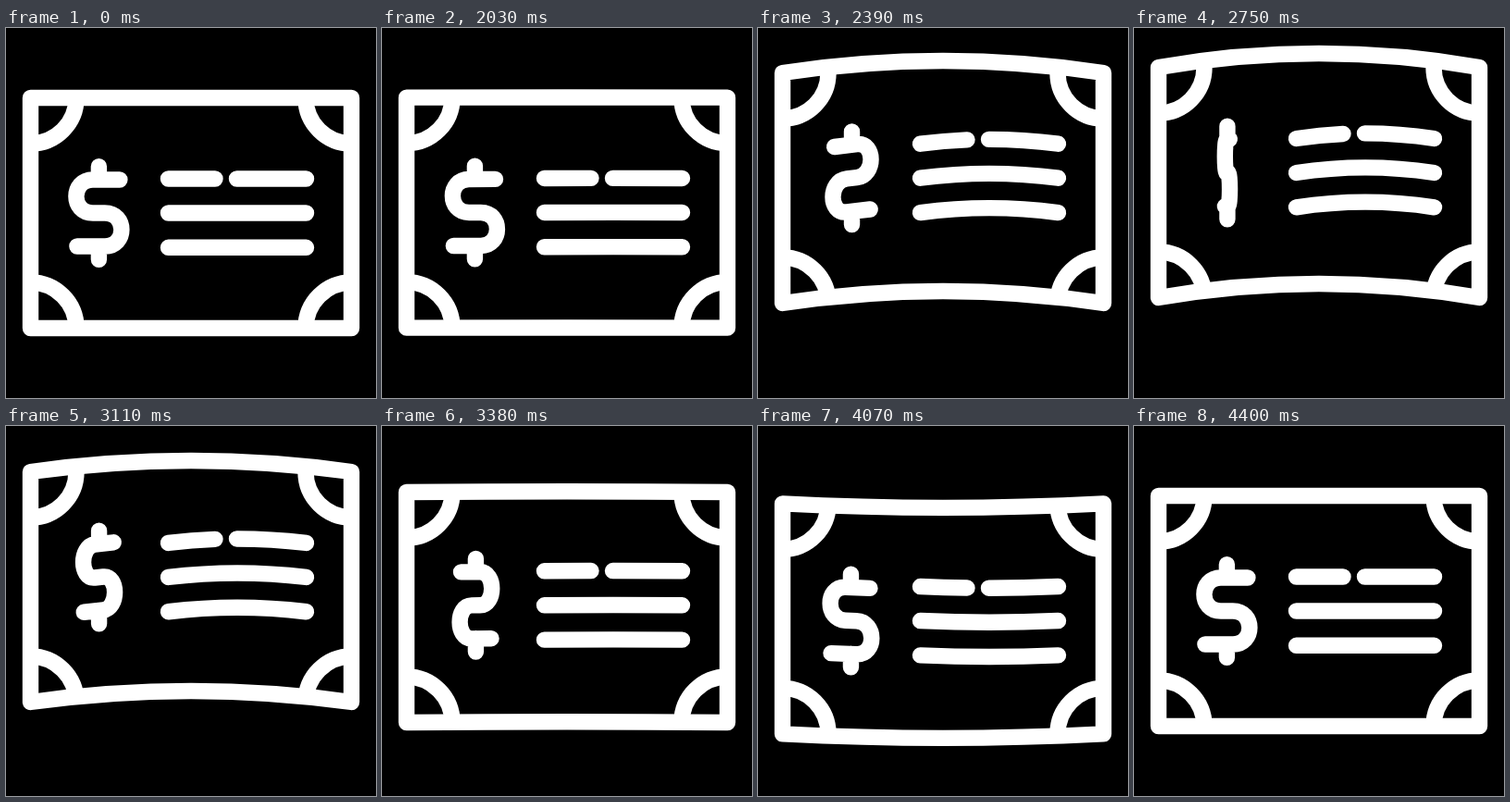
Recreate the animation shown at these times as an HTML page. Size 400 by 400 pixels, loop 4.43 s.

```html
<!DOCTYPE html>
<html lang="en">
<head>
<meta charset="utf-8">
<title>Banknote</title>
<style>
  html, body { margin: 0; width: 100%; height: 100%; overflow: hidden; background: #000; }
  svg { display: block; width: 100%; height: 100%; }
  path { fill: none; stroke: #fff; stroke-width: 17.4; stroke-linejoin: round; }
  #lines, #dollar { stroke-linecap: round; }
</style>
</head>
<body>
<svg viewBox="0 0 400 400">
  <path id="bill"/>
  <path id="corners"/>
  <path id="lines"/>
  <path id="dollar"/>
</svg>
<script>
const LOOP = 4430, START = 2030, STEP = 30;
const L = 26.5, R = 373.5, T = 75.5, B = 324.5, ARC = 49.5;

const times = [2000, 2390, 2540, 2780, 3110, 3380, 3620, 3740, 3780, 4160, 4400];
const edgeY = [0, -27, -31, -33, -26, -4, 11, 14, 14.3, 6, 0];
const bendY = [0, -13, -14, -15, -12, -0.7, 7, 8, 8.3, 3, 0];
const innerY = [0, -37.7, -41, -43.5, -36.5, -6.2, 13.5, 17.5, 18, 7.5, 0];
const turn = [0, 147, 200, 287, 406, 495, 580, 620, 632, 707, 720];

// Monotone cubic through the keys
function track(vals, startSlope = 0) {
  const sec = times.slice(1).map((t, i) => (vals[i + 1] - vals[i]) / (t - times[i]));
  const slope = vals.map((v, i) => {
    if (i === 0) return startSlope;
    if (i === vals.length - 1) return 0;
    const a = sec[i - 1], b = sec[i];
    return a * b > 0 ? 2 * a * b / (a + b) : 0;
  });
  return t => {
    if (t <= times[0] || t >= times[times.length - 1]) return vals[0];
    const i = times.findIndex(k => k > t) - 1;
    const h = times[i + 1] - times[i], u = (t - times[i]) / h, w = 1 - u;
    return w * w * ((1 + 2 * u) * vals[i] + u * h * slope[i])
         + u * u * ((3 - 2 * u) * vals[i + 1] - w * h * slope[i + 1]);
  };
}

const edge = track(edgeY), bend = track(bendY), inner = track(innerY);
const angle = track(turn, 0.374);

const set = (id, d) => document.getElementById(id).setAttribute("d", d);

// Exact quadratic for a parabola f between x0 and x1
function bow(x0, x1, f, join = "M") {
  const m = (x0 + x1) / 2, a = f(x0), b = f(x1);
  return `${join}${x0} ${a}Q${m} ${2 * f(m) - (a + b) / 2} ${x1} ${b}`;
}

function draw(t) {
  const e = edge(t), k = bend(t), y = inner(t);

  const sag = x => e + k * (1 - ((x - 200) / 173.5) ** 2);
  set("bill", bow(L, R, x => T + sag(x)) + bow(R, L, x => B + sag(x), "L") + "Z");

  const arc = (x, cy, sx, sy) =>
    `M${x} ${cy + e + sy * ARC}A${ARC} ${ARC} 0 0 ${sx * sy > 0 ? 0 : 1} ${x + sx * ARC} ${cy + e}`;
  set("corners", arc(L, T, 1, 1) + arc(R, T, -1, 1) + arc(L, B, 1, -1) + arc(R, B, -1, -1));

  const row = base => x => base + y + k * 0.38 * (1 - ((x - 250) / 75) ** 2);
  set("lines", bow(175.5, 226, row(163)) + bow(249.5, 324.5, row(163))
    + bow(175.5, 324.5, row(200)) + bow(175.5, 324.5, row(237.3)));

  // Dollar sign turns about its vertical axis and leans with the paper
  const s = Math.cos(angle(t) * Math.PI / 180), lean = k * 0.009, cx = 101 - 0.6 * s;
  const p = (dx, dy) => `${cx + dx * s} ${200 + y + dy + dx * s * lean} `;
  set("dollar",
    "M" + p(0, -50.3) + "L" + p(0, -36) +
    "M" + p(22.5, -36) + "L" + p(-6.5, -36) +
    "C" + p(-30.5, -36) + p(-30.5, 0) + p(-6.5, 0) +
    "L" + p(6.5, 0) +
    "C" + p(30.5, 0) + p(30.5, 36) + p(6.5, 36) +
    "L" + p(-23.5, 36) +
    "M" + p(0, 36) + "L" + p(0, 50.3));
}

const begin = performance.now();
function tick() {
  const t = (performance.now() - begin) % LOOP;
  draw(t < START ? 0 : START + Math.floor((t - START) / STEP) * STEP);
  requestAnimationFrame(tick);
}
tick();
</script>
</body>
</html>
```
